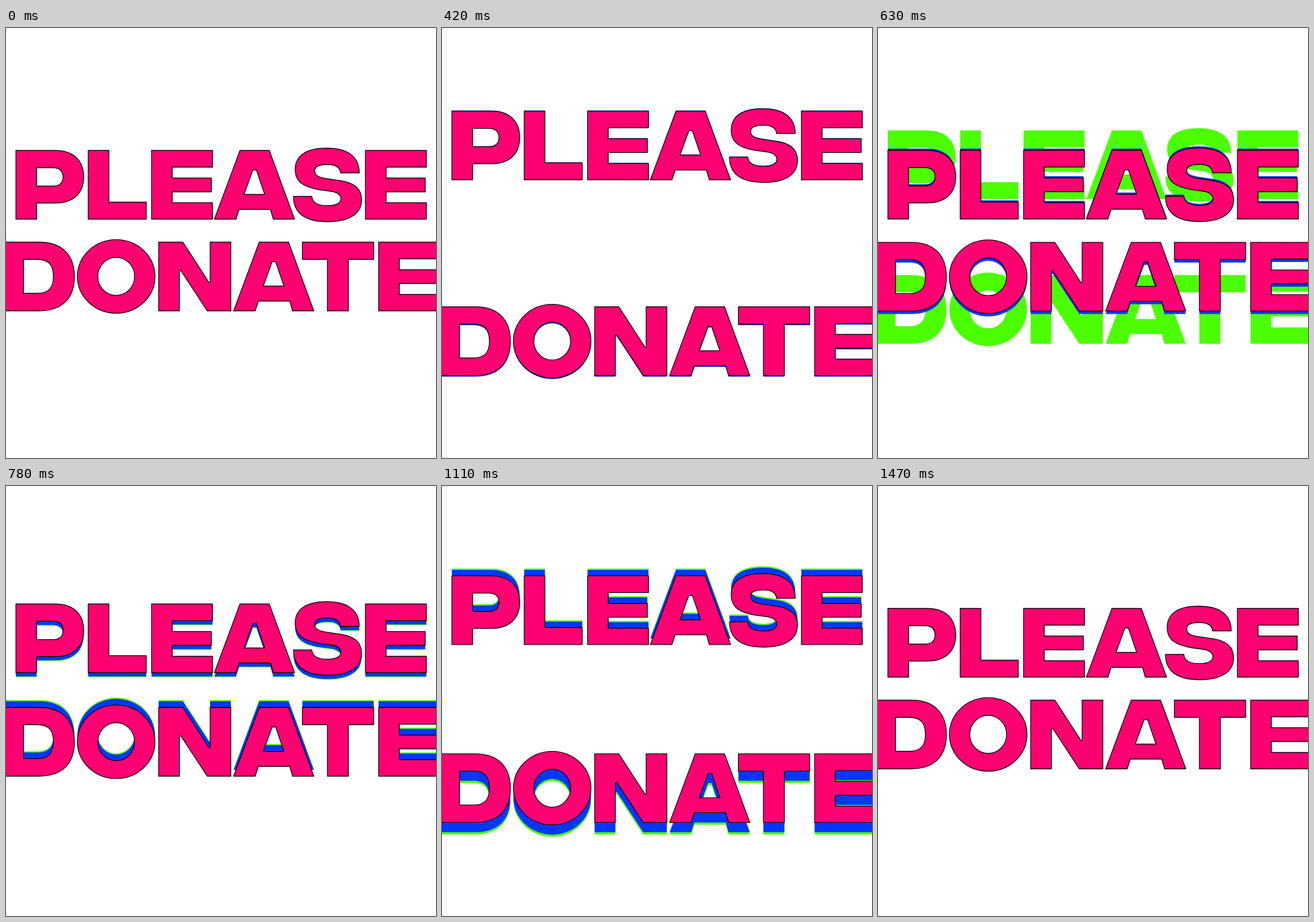
Write an HTML page that moves like this. It is 748x748 px and loops after 1800 ms.

```html
<!DOCTYPE html>
<html lang="en">
<head>
<meta charset="utf-8">
<title>Please donate</title>
<style>
  html, body { margin: 0; width: 100%; height: 100%; overflow: hidden; background: #fff; }
  svg { display: block; width: 748px; height: 748px; }
  path { fill-rule: evenodd; }
  .green { fill: #4cff00; }
  .blue { fill: #0037ff; }
  .pink { fill: #ff0070; stroke: #000; stroke-width: 1.3; }
</style>
</head>
<body>
<svg id="stage" viewBox="0 0 748 748" role="img" aria-label="PLEASE DONATE"></svg>
<script>
// Wide capitals, drawn from the top left corner of each letter
const GLYPHS = {
  P: 'M0 0H68C101 0 118 18 118 46C118 74 101 91.5 68 91.5H36V119.5H0ZM36 30V62H64C76 62 82 56 82 46C82 36 76 30 64 30Z',
  L: 'M0 0H36V90H101V119.5H0Z',
  E: 'M0 0H106V29H36V48H104V72H36V91H106V119.5H0Z',
  A: 'M0 119.5L44.5 0H95.5L139.5 119.5H102.5L97.5 102.5H43L37.5 119.5ZM51.5 76.5H87.5L73 34H67Z',
  S: 'M114.5 39H82C81 29 73 24.5 59 24.5C45 24.5 37 28 37 35C37 43 42 46 54 48.5L84 53C106 57 118.5 66 118.5 86' +
     'C118.5 112 94 124 60 124C20 124 0 109 0 80H32C33 91 42 96 59 96C74 96 82.5 91.5 82.5 84C82.5 77 77 73 65 71' +
     'L46 68.5C18 64 3 55 3 33C3 9 22 -4 58 -4C92 -4 114.5 9 114.5 39Z',
  D: 'M0 0H63C104 0 124.5 23 124.5 60C124.5 97 104 119.5 63 119.5H0ZM36 30V89H60C79 89 88 80 88 60C88 39 79 30 60 30Z',
  O: 'M0 59.7A67.5 64 0 0 1 135 59.7A67.5 64 0 0 1 0 59.7ZM35.5 59.7A32 33 0 0 0 99.5 59.7A32 33 0 0 0 35.5 59.7Z',
  N: 'M0 0H42L87.5 70H89.5V0H125.5V119.5H84.5L38.5 49.5H36V119.5H0Z',
  T: 'M0 0H124V30H80V119.5H43.5V30H0Z'
};

const WORDS = [
  { text: 'PLEASE', xs: [17.2, 143, 253.2, 362.5, 500, 625.2], y: 213, travel: -69.5 },
  { text: 'DONATE', xs: [-5.5, 124.2, 265.6, 396, 515.6, 648.2], y: 372.5, travel: 114.5 }
];

const LAYERS = [
  { name: 'green', lag: 4 },
  { name: 'blue', lag: 2 },
  { name: 'pink', lag: 0 }
];

const TICK = 30, TICKS = 60;

// Moves between rest (0) and spread (1), in ticks; a and b are the handles of the ease
const MOVES = [
  { start: 0, end: 12, from: 0, to: 1, a: 1, b: 0 },
  { start: 12, end: 22, from: 1, to: 0, a: 1, b: 0 },
  { start: 22, end: 32, from: 0, to: 1, a: 1, b: 0 },
  { start: 32, end: 45, from: 1, to: 0, a: 0.84, b: 0 }
];

// cubic-bezier(a, 0, b, 1)
function ease(x, a, b) {
  let lo = 0, hi = 1, s = 0.5;
  for (let i = 0; i < 40; i++) {
    s = (lo + hi) / 2;
    const r = 1 - s;
    const d = 3 * a * s * r * r + 3 * b * s * s * r + s * s * s - x;
    if (d === 0) break;
    if (d < 0) lo = s; else hi = s;
  }
  return s * s * (3 - 2 * s);
}

function spread(tick) {
  const m = MOVES.find(m => tick >= m.start && tick < m.end);
  if (!m) return 0;
  const k = ease((tick - m.start) / (m.end - m.start), m.a, m.b);
  return m.from + (m.to - m.from) * k;
}

function add(parent, tag, attrs) {
  const el = document.createElementNS('http://www.w3.org/2000/svg', tag);
  for (const key in attrs) el.setAttribute(key, attrs[key]);
  return parent.appendChild(el);
}

const stage = document.getElementById('stage');
const parts = WORDS.flatMap(word => LAYERS.map(layer => {
  const el = add(stage, 'g', { class: layer.name });
  [...word.text].forEach((c, i) =>
    add(el, 'path', { d: GLYPHS[c], transform: `translate(${word.xs[i]} 0)` }));
  return { el, word, layer };
}));

const t0 = performance.now();

function draw() {
  const tick = Math.floor((performance.now() - t0 + 2) / TICK) % TICKS;
  for (const { el, word, layer } of parts) {
    const y = word.y + word.travel * spread(tick - layer.lag);
    el.setAttribute('transform', `translate(0 ${y.toFixed(2)})`);
  }
  requestAnimationFrame(draw);
}
draw();
</script>
</body>
</html>
```
